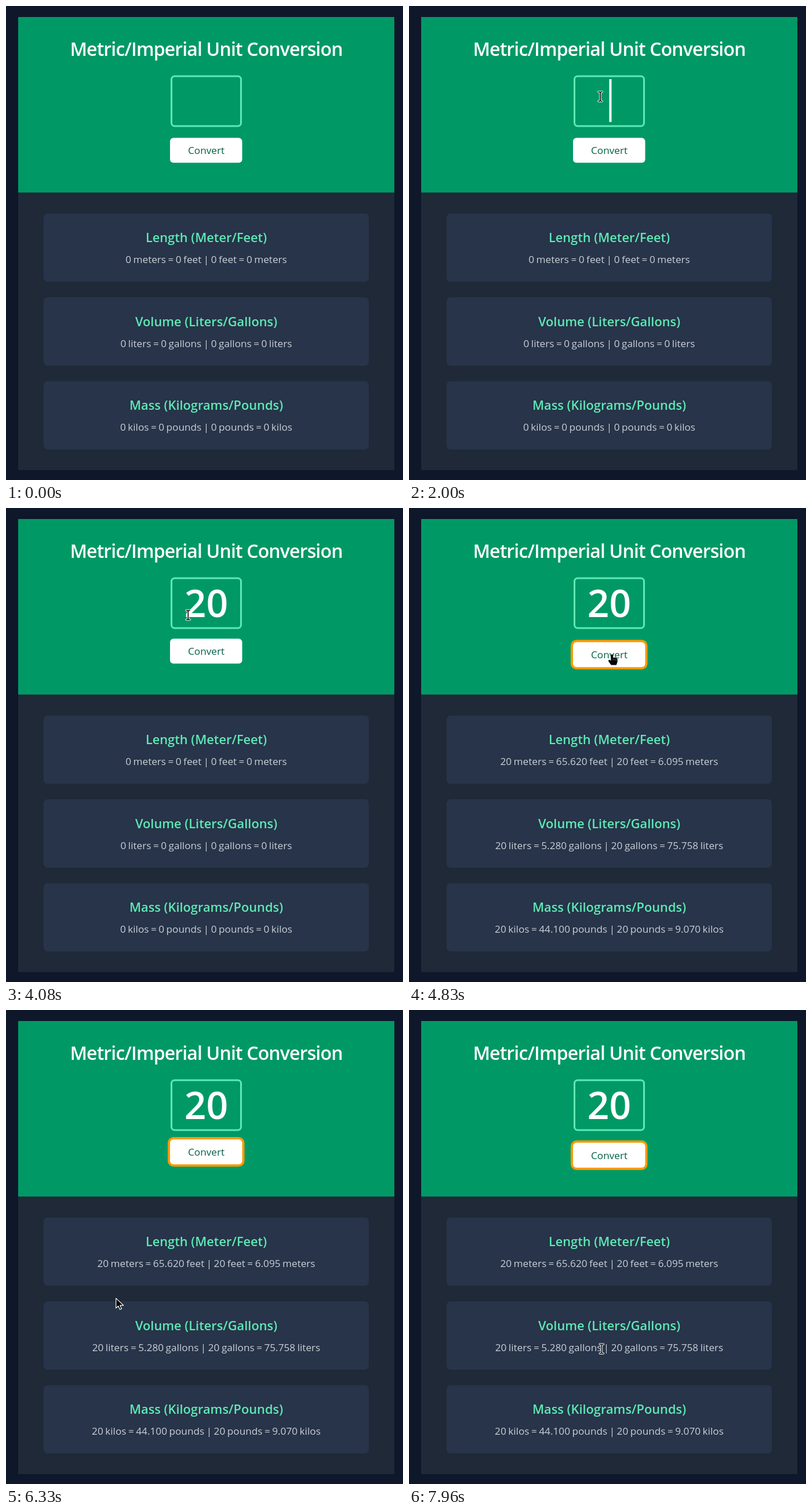
Write an HTML page that moves like this. It is 685 px wide and 817 px high and loops after 8 s.

```html
<!DOCTYPE html>
<html lang="en">
<head>
<meta charset="utf-8">
<title>Unit Conversion</title>
<style>
  html, body { margin: 0; width: 100%; height: 100%; overflow: hidden; background: #0f172a; }
  svg { display: block; width: 685px; height: 817px; }
  text { font-family: "Open Sans", "Noto Sans", sans-serif; text-anchor: middle; }
  .title { font-size: 32px; font-weight: 600; letter-spacing: -.85px; fill: #fff; }
  .amount { font-size: 66px; font-weight: 600; fill: #fff; }
  .label { font-size: 17.2px; fill: #006045; }
  .heading { font-size: 21.8px; font-weight: 600; fill: #5ee9b5; }
  .result { font-size: 17.2px; word-spacing: -1px; fill: #cbd0d8; }
  .pointer { stroke-linejoin: round; stroke-linecap: round; }
</style>
</head>
<body>
<svg viewBox="0 0 685 817">
  <defs>
    <path id="stem" d="M-3-8H-1.2L0-7L1.2-8H3M0-7V7M-3 8H-1.2L0 7L1.2 8H3"/>
  </defs>
  <rect x="21" y="19" width="649" height="781" fill="#1f2937"/>
  <rect x="21" y="19" width="649" height="302.5" fill="#009966"/>
  <text class="title" x="345.5" y="86">Metric/Imperial Unit Conversion</text>

  <rect x="285.5" y="121" width="120" height="86" rx="5.5" fill="none" stroke="#5ee9b5" stroke-width="3"/>
  <text id="amount" class="amount" x="345.5" y="188"></text>
  <rect id="caret" y="126" width="4" height="74" fill="#fff"/>

  <g id="button">
    <rect id="ring" x="279" y="229.7" width="132.5" height="51" rx="10" fill="#fe9a00"/>
    <rect x="283" y="233.7" width="124.5" height="43" rx="6" fill="#fff"/>
    <text class="label" x="345.5" y="261.5">Convert</text>
  </g>

  <g id="cards"></g>

  <g id="arrow" class="pointer">
    <path d="M0 0V17L4 13.3L6.8 19.3L9.7 18L7 12.2H13Z" fill="#000" stroke="#fff" stroke-width="1.2"/>
  </g>
  <g id="beam" class="pointer" fill="none">
    <use href="#stem" stroke="#fff" stroke-width="3.6"/>
    <use href="#stem" stroke="#000" stroke-width="1.6"/>
  </g>
  <g id="hand" class="pointer">
    <path d="M-1.5 1Q0-.8 1.5 1V6L4 5.7L6.5 6.5L9 7.8V13L7.3 18H-1.5L-6 11.5Q-6 9-3.5 10L-1.5 11.5Z"
      fill="#000" stroke="#111" stroke-width=".8"/>
    <path d="M2 7V10M4.5 8V10.5M7 9V11" stroke="#aaa" stroke-width=".6"/>
  </g>
</svg>
<script>
const LOOP = 8000, STEPS = 192, STEP = LOOP / STEPS, CLICK = 4700;
const $ = id => document.getElementById(id);

// heading, result before the click, result after it
const cards = [
  ["Length (Meter/Feet)", "0 meters = 0 feet | 0 feet = 0 meters",
    "20 meters = 65.620 feet | 20 feet = 6.095 meters"],
  ["Volume (Liters/Gallons)", "0 liters = 0 gallons | 0 gallons = 0 liters",
    "20 liters = 5.280 gallons | 20 gallons = 75.758 liters"],
  ["Mass (Kilograms/Pounds)", "0 kilos = 0 pounds | 0 pounds = 0 kilos",
    "20 kilos = 44.100 pounds | 20 pounds = 9.070 kilos"]
];

$("cards").innerHTML = cards.map(([heading], i) => `
  <g transform="translate(0 ${i * 144.5})">
    <rect x="65" y="357.5" width="561" height="118" rx="6.5" fill="#273449"/>
    <text class="heading" x="345.5" y="407">${heading}</text>
    <text class="result" x="345.5" y="443"></text>
  </g>`).join("");
const results = [...document.querySelectorAll(".result")];

// time, x, y, pointer shown from here on
const path = [
  [0, 685, 715, ""],
  [40, 680, 711, "arrow"],
  [300, 300, 520, "arrow"],
  [430, 124, 240, "arrow"],
  [580, 300, 60, "arrow"],
  [760, 590, 200, "arrow"],
  [870, 626, 350, "arrow"],
  [1120, 411, 285, "arrow"],
  [1290, 365, 207, "beam"],
  [1480, 332, 158, "beam"],
  [1660, 330, 156, "beam"],
  [2500, 330, 156, ""],
  [3700, 330, 156, "beam"],
  [4080, 314, 184, "beam"],
  [4220, 325, 207, "arrow"],
  [4330, 336, 230, "hand"],
  [4500, 350, 252, "hand"],
  [5710, 351, 253, "hand"],
  [5790, 340, 275, "arrow"],
  [5835, 330, 290, "arrow"],
  [6060, 245, 400, "arrow"],
  [6330, 190, 496, "arrow"],
  [6560, 172, 558, "arrow"],
  [6640, 171, 572, "beam"],
  [7000, 164, 582, "beam"],
  [7540, 165, 586, "beam"],
  [7960, 333, 584, "beam"],
  [LOOP, 340, 584, "beam"]
];

const caretSpans = [[1740, 2340], [2880, 3300], [4210, CLICK]];

const bounce = $("button").animate([
  { transform: "translateY(-10.75px)", easing: "cubic-bezier(.8,0,1,1)" },
  { transform: "translateY(0)", easing: "cubic-bezier(0,0,.2,1)" },
  { transform: "translateY(-10.75px)" }
], { duration: 1000, iterations: Infinity });
bounce.pause();

const show = (node, on) => node.setAttribute("visibility", on ? "visible" : "hidden");

function movePointer(t) {
  const next = path.findIndex(p => p[0] > t);
  const [t0, x0, y0, kind] = path[next - 1];
  const [t1, x1, y1] = path[next];
  const k = (t - t0) / (t1 - t0);
  for (const id of ["arrow", "beam", "hand"]) {
    show($(id), id === kind);
    $(id).setAttribute("transform", `translate(${x0 + (x1 - x0) * k} ${y0 + (y1 - y0) * k})`);
  }
}

function draw(time) {
  const t = Math.floor((time % LOOP + 4) / STEP) % STEPS * STEP;
  const done = t >= CLICK;
  bounce.currentTime = t + 630;
  const typed = t < 3020 ? "" : t < 3180 ? "2" : "20";
  $("amount").textContent = typed;
  $("caret").setAttribute("x", 345.5 + typed.length * 18.8);
  show($("caret"), caretSpans.some(([a, b]) => t >= a && t < b));
  show($("ring"), done);
  results.forEach((node, i) => node.textContent = cards[i][done ? 2 : 1]);
  movePointer(t);
}

const start = performance.now();
function tick() {
  draw(performance.now() - start);
  requestAnimationFrame(tick);
}
tick();
</script>
</body>
</html>
```
